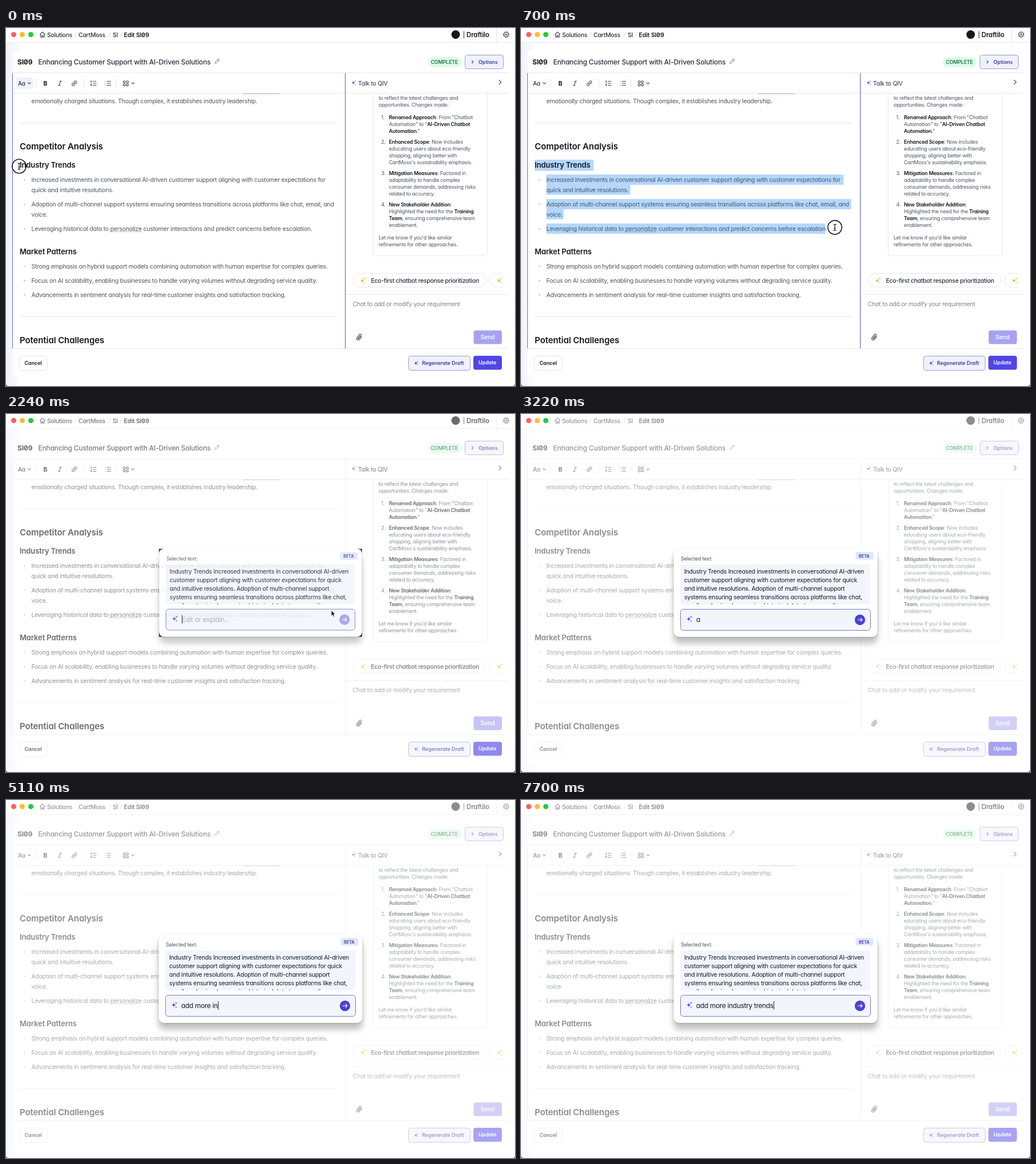
Write an HTML page that moves like this. It is 892 px wide and 628 px high and loops after 8000 ms.

```html
<!DOCTYPE html>
<html lang="en">
<head>
<meta charset="utf-8">
<title>Requirement editor</title>
<style>
  html, body { margin: 0; width: 100%; height: 100%; overflow: hidden; background: #fff; }
  svg { display: block; }
  text { font: 400 10.5px Inter, "Liberation Sans", sans-serif; letter-spacing: -.022em;
         font-feature-settings: "cv11", "zero"; fill: #4b5563; white-space: pre; }
  .dark { fill: #111827; }
  .medium { font-weight: 500; fill: #2b303b; letter-spacing: -.027em; }
  .strong { font-weight: 600; fill: #14171f; letter-spacing: -.012em; }
  .title { font-size: 12px; letter-spacing: -.015em; }
  .h2 { font-size: 15px; font-weight: 600; fill: #14171f; letter-spacing: -.007em; }
  .h3 { font-size: 13px; font-weight: 600; fill: #14171f; letter-spacing: -.009em; }
  .button { font-size: 9px; font-weight: 600; letter-spacing: -.005em; }
  .small { font-size: 9px; letter-spacing: -.026em; }
  .small tspan { font-weight: 600; fill: #14171f; }
  .entry { font-size: 12px; letter-spacing: -.028em; }
  .indigo { fill: #413d9f; }
  .grey { fill: #7b828f; }
  .white { fill: #fff; }
  .rule { stroke: #e5e7eb; fill: none; }
  .box { stroke: #e5e7eb; fill: #fff; }
  .soft { stroke: #9a9bcd; fill: #eff2fc; }
  .icon { stroke: #3c4350; fill: none; stroke-width: 1.1; stroke-linecap: round; stroke-linejoin: round; }
  .dots { stroke: #6b7280; stroke-dasharray: 1 1; }
</style>
</head>
<body>
<svg width="892" height="628" viewBox="0 0 892 628">
  <defs>
    <linearGradient id="edge"><stop stop-color="#eff3f9"/><stop offset="1" stop-color="#fafbfd"/></linearGradient>
    <clipPath id="quoteClip"><path d="M279 264h333v70H279z"/></clipPath>
    <g id="sparkle">
      <path id="star" d="M0-4.6C.5-1.2 1.2-.5 4.6 0 1.2.5.5 1.2 0 4.6-.5 1.2-1.2.5-4.6 0-1.2-.5-.5-1.2 0-4.6z"/>
      <use href="#star" transform="translate(4 -3.6) scale(.45)"/>
      <use href="#star" transform="translate(4 3.8) scale(.38)"/>
    </g>
    <path id="chevron" d="M-2.3-1.1 0 1.2 2.3-1.1"/>
  </defs>

  <rect width="892" height="628" fill="#fff"/>
  <path d="M0 26H24V40H12V613H23V628H0z" fill="url(#edge)"/>

  <!-- title bar -->
  <path class="rule" d="M0 25.5H892M859.5 0V25"/>
  <path class="icon" d="M59.5 11.3 64 7l4.5 4.3M60.8 10.5V16h6.4V10.5M63 16v-3h2v3"/>
  <text class="medium" x="72" y="15.5">Solutions</text>
  <text class="medium" x="127" y="15.5">CartMoss</text>
  <text class="medium" x="187" y="15.5">SI</text>
  <text class="strong" x="206.5" y="15.5">Edit SI09</text>
  <path stroke="#d3d6dc" d="M120.5 15.5 123.5 7.5M180.5 15.5 183.5 7.5M200 15.5 203 7.5"/>
  <circle cx="788" cy="11.5" r="7.5" fill="#17181c"/>
  <path stroke="#333" d="M802.5 5.5V18"/>
  <text class="strong" x="807" y="15.5" style="font-size:11.5px">Draftilo</text>
  <g class="icon"><circle cx="876.5" cy="11.5" r="4"/><circle cx="876.5" cy="11.5" r="1.5"/>
    <circle cx="876.5" cy="11.5" r="4.8" stroke-width="1.3" stroke-dasharray="1.6 2.17" stroke-linecap="butt"/></g>

  <!-- document header -->
  <text class="strong title" x="20" y="63.5" style="font-weight:700">SI09</text>
  <text class="medium title" x="56.5" y="63.5">Enhancing Customer Support with AI-Driven Solutions</text>
  <path class="icon" stroke-width=".9" style="stroke:#9aa1ad" d="M365.8 62.5l.7-2.7 5.7-5.7 2 2-5.7 5.7zM370.8 55.5l2 2"/>
  <rect x="739.5" y="51" width="59" height="18" rx="9" fill="#dcfce7"/>
  <text class="small" x="744.5" y="63" style="font-weight:500;fill:#166534">COMPLETE</text>
  <rect class="soft" x="804.5" y="47.5" width="67" height="24" rx="4"/>
  <use href="#chevron" class="icon" style="stroke:#413d9f" transform="translate(817.5 59.5) rotate(-90)"/>
  <text class="button indigo" x="828" y="62.8">Options</text>
  <path class="rule" d="M12 78.5H881M12 114.5H881M12 562.5H881M11.5 79V562M595.5 79V562"/>

  <!-- toolbar -->
  <rect id="styleHover" x="18" y="86" width="29.5" height="21.5" rx="4" fill="#f0f2fb"/>
  <text class="medium" x="21" y="100.5" style="font-size:10px">Aa</text>
  <use href="#chevron" class="icon" x="40.8" y="97"/>
  <text class="strong" x="65.5" y="100.8" style="font-weight:700">B</text>
  <path class="icon" d="M93.8 93.2h3.8M91.2 100.7H95M95.7 93.2l-2.6 7.5"/>
  <g class="icon" transform="translate(119.8 97) rotate(-45)"><path d="M-.8-2H-3a2 2 0 0 0 0 4h2.2M.8-2H3a2 2 0 0 1 0 4H.8M-2 0H2"/></g>
  <path class="rule" d="M52.5 89v16M136.5 89v16M192.5 89v16"/>
  <path class="icon" d="M152.5 93.5h5.5M152.5 97h5.5M152.5 100.5h5.5M148.5 93.3l1-.5V96M148.5 98.5h1.5l-1.5 2.5h1.5M177 93.5h6.5M177 97h6.5M177 100.5h6.5M173.8 93.5h.1M173.8 97h.1M173.8 100.5h.1"/>
  <g class="icon"><rect x="205.5" y="92.8" width="3.4" height="3.4" rx="1"/><rect x="211" y="92.8" width="3.4" height="3.4" rx="1"/>
    <rect x="205.5" y="98" width="3.4" height="3.4" rx="1"/><rect x="211" y="98" width="3.4" height="3.4" rx="1"/></g>
  <use href="#chevron" class="icon" x="222.5" y="97"/>

  <!-- document -->
  <path class="rule" d="M24 166.5H581.5M24 506.5H581.5"/>
  <path class="dots" d="M416 115.5h64"/>
  <g id="selection" fill="#b3d7ff"></g>
  <g id="document"></g>
  <path class="dots" d="M182 357.5h55"/>

  <!-- chat -->
  <use href="#sparkle" fill="#4f46e5" transform="translate(608.8 96) scale(.8)"/>
  <text x="617" y="100.8" style="fill:#2b303b">Talk to QIV</text>
  <use href="#chevron" class="icon" style="stroke:#6b7280" transform="translate(866 95) rotate(-90) scale(1.5)"/>
  <path class="rule" d="M643.5 115V394.5a5 5 0 0 0 5 5H838.5a5 5 0 0 0 5-5V115M596 467.5H881"/>
  <g id="chat"></g>
  <rect class="box" x="608.5" y="430.5" width="232" height="24" rx="12"/>
  <path class="rule" d="M870 430.5H859.5a12 12 0 0 0 0 24H870"/>
  <use href="#sparkle" fill="#eab93b" transform="translate(624.5 443)"/>
  <use href="#sparkle" fill="#eab93b" transform="translate(864 443)"/>
  <path fill="#fff" d="M870 430h8v26h-8z"/>
  <text class="medium" x="639.5" y="446.6">Eco-first chatbot response prioritization</text>
  <text class="grey" x="607.5" y="488.3">Chat to add or modify your requirement</text>
  <g class="icon" transform="translate(619 542.5) rotate(40)"><path d="M2.8-3.5V3a2.8 2.8 0 0 1-5.6 0V-4a1.9 1.9 0 0 1 3.8 0V2.6a.9.9 0 0 1-1.8 0V-3"/></g>
  <rect x="819.5" y="530.5" width="49.5" height="24" rx="4" fill="#a7a2f0"/>
  <text class="white" x="831.5" y="546.3" style="font-weight:500">Send</text>

  <!-- footer -->
  <rect class="box" x="23.5" y="575.5" width="49" height="25" rx="4"/>
  <text class="button dark" x="32.5" y="591">Cancel</text>
  <rect class="soft" x="705.5" y="575.5" width="108" height="25" rx="4"/>
  <use href="#sparkle" fill="#413d9f" transform="translate(718.3 588) scale(.75)"/>
  <text class="button indigo" x="729" y="591">Regenerate Draft</text>
  <rect x="819" y="575" width="50" height="24.5" rx="4" fill="#4f46e5"/>
  <text class="button white" x="828" y="590.3">Update</text>

  <path id="focusLines" stroke="#6c69cf" d="M11.5 79V562M594.5 79V562"/>
  <g id="assist">
    <circle cx="564.5" cy="345" r="9.7" fill="#e0e5fb"/>
    <use href="#sparkle" fill="#4f46e5" transform="translate(564 345)"/>
  </g>
  <rect id="dim" width="892" height="628" fill="#fff"/>
  <circle cx="13.5" cy="11.5" r="4.5" fill="#ff5f57"/>
  <circle cx="28.5" cy="11.5" r="4.5" fill="#febc2e"/>
  <circle cx="43.5" cy="11.5" r="4.5" fill="#28c840"/>
  <path d="M0 624V628H4A4 4 0 0 1 0 624zM892 624V628H888A4 4 0 0 0 892 624z" fill="#222"/>

  <!-- edit dialog -->
  <g id="dialog">
    <path id="corners" fill="#222" fill-rule="evenodd" d="M267 236H625V391.5H267zM276 236H616a9 9 0 0 1 9 9V382.5a9 9 0 0 1-9 9H276a9 9 0 0 1-9-9V245a9 9 0 0 1 9-9z"/>
    <rect x="267.5" y="236" width="357" height="155" rx="9" fill="#fff" style="filter:drop-shadow(0 11px 6px rgba(0,0,0,.22)) drop-shadow(0 1px 1.5px rgba(0,0,0,.2))"/>
    <text class="small" x="280" y="257">Selected text:</text>
    <rect x="586.5" y="242" width="31" height="13.5" rx="3" fill="#e0e7ff"/>
    <text class="button indigo" x="592" y="251.5" style="font-size:7.3px">BETA</text>
    <rect x="279" y="264" width="333" height="70" fill="#f2f5fc"/>
    <g id="quote" clip-path="url(#quoteClip)"></g>
    <rect x="279.5" y="342.5" width="333" height="37" rx="5" fill="#f2f5fc" stroke="#7779bd"/>
    <use href="#sparkle" fill="#4f46e5" transform="translate(294 359.5)"/>
    <text id="placeholder" class="entry" x="307" y="365" style="fill:#9ca3af">Edit or explain...</text>
    <text id="typed" class="entry dark" x="307" y="365"></text>
    <rect id="caret" y="353" width="1" height="15" fill="#111827"/>
    <circle id="send" cx="594" cy="361" r="9.2" fill="#4a41d3"/>
    <path d="M589.8 361h8.2M594.7 357.6l3.4 3.4-3.4 3.4" fill="none" stroke="#fff" stroke-width="1.1"/>
  </g>

  <g id="pointer">
    <g id="beam" fill="none" stroke="#17181c">
      <circle id="ring" r="12.2" stroke-width="1.6"/>
      <path stroke-width="1.2" d="M-2.5-5.5Q0-5.5 0-4Q0-5.5 2.5-5.5M0-4.5V4.5M-2.5 5.5Q0 5.5 0 4Q0 5.5 2.5 5.5M-1.5 1.5H1.5"/>
    </g>
    <path id="arrow" d="M0 0V9.8L2.3 7.7 3.9 11.3 5.7 10.5 4.1 7H7.2z" fill="#111" stroke="#fff" stroke-width=".8"/>
  </g>
</svg>
<script>
const $ = id => document.getElementById(id);
const clamp = (v, lo = 0, hi = 1) => Math.min(hi, Math.max(lo, v));
const smooth = u => u * u * (3 - 2 * u);
const show = (id, on) => $(id).setAttribute("visibility", on ? "visible" : "hidden");

// Lines of text going down from (x, y); *...* marks bold words.
function write(id, cls, x, y, step, ...lines) {
  $(id).innerHTML += lines.map((line, i) =>
    `<text class="${cls}" x="${x}" y="${y + i * step}">${line.replace(/\*(.+?)\*/g, "<tspan>$1</tspan>")}</text>`).join("");
}
function bullet(y, ...lines) {
  $("document").innerHTML += `<circle cx="32.5" cy="${y - 3.5}" r="1.7" fill="#d3d8e0"/>`;
  write("document", "", 44.5, y, 18, ...lines);
}

write("document", "", 44.5, 131.8, 18, "emotionally charged situations. Though complex, it establishes industry leadership.");
write("document", "h2", 24, 213.2, 340, "Competitor Analysis", "Potential Challenges");
write("document", "h3", 24, 244.9, 152, "Industry Trends", "Market Patterns");
bullet(269.7, "Increased investments in conversational AI-driven customer support aligning with customer expectations for",
  "quick and intuitive resolutions.");
bullet(312.8, "Adoption of multi-channel support systems ensuring seamless transitions across platforms like chat, email, and", "voice.");
bullet(355.8, "Leveraging historical data to personalize customer interactions and predict concerns before escalation.");
bullet(421.6, "Strong emphasis on hybrid support models combining automation with human expertise for complex queries.");
bullet(446.7, "Focus on AI scalability, enabling businesses to handle varying volumes without degrading service quality.");
bullet(471.8, "Advancements in sentiment analysis for real-time customer insights and satisfaction tracking.");

write("chat", "small", 653, 126, 12, "to reflect the latest challenges and", "opportunities. Changes made:");
[
  [159.7, "*Renamed Approach*: From \"Chatbot", "Automation\" to \"*AI-Driven Chatbot*", "*Automation*.\""],
  [202.8, "*Enhanced Scope*: Now includes", "educating users about eco-friendly", "shopping, aligning better with", "CartMoss's sustainability emphasis."],
  [257.9, "*Mitigation Measures*: Factored in", "adaptability to handle complex", "consumer demands, addressing risks", "related to accuracy."],
  [313, "*New Stakeholder Addition*:", "Highlighted the need for the *Training*", "*Team*, ensuring comprehensive team", "enablement."]
].forEach(([y, ...lines], i) => {
  write("chat", "small", 657.5, y, 12, `${i + 1}.`);
  write("chat", "small", 671, y, 12, ...lines);
});
write("chat", "small", 653, 371.2, 12, "Let me know if you'd like similar", "refinements for other approaches.");

write("quote", "dark", 286, 279.7, 15, "Industry Trends Increased investments in conversational AI-driven",
  "customer support aligning with customer expectations for quick", "and intuitive resolutions. Adoption of multi-channel support",
  "systems ensuring seamless transitions across platforms like chat,", "email, and voice. Leveraging historical data to personalize");

// Selectable lines: left, right, top, bottom
const lines = [[24, 127, 231, 250.5], [44.5, 565, 257, 275], [44.5, 191.5, 275, 292.5],
  [44.5, 578.5, 300, 318], [44.5, 74.5, 318, 335.5], [44.5, 533, 343, 361]];
$("selection").innerHTML = lines.map(([x, , top, bottom]) =>
  `<rect x="${x}" y="${top}" height="${bottom - top}"/>`).join("");

const phrase = "add more industry trends";
const keyTimes = [2730, 3290, 3430, 3570, 3710, 3850, 3990, 4200, 4340, 4550, 5110, 5390,
  5740, 5880, 6020, 6160, 6440, 6580, 6650, 6790, 6930, 7420, 7560, 7700];

function select(x, y) {
  lines.forEach(([left, right, , bottom], i) => {
    const above = i ? lines[i - 1][3] : 0;
    const end = y > bottom ? right : y > above ? clamp(x, left, right) : left;
    $("selection").children[i].setAttribute("width", end - left);
  });
}

function movePointer(t) {
  const drag = smooth(clamp((t - 70) / 630));
  const approach = smooth(clamp((t - 1190) / 350));
  const settle = clamp((t - 1820) / 210);
  const x = 23 + 527 * drag + 16 * approach + 4 * settle;
  const y = 242.5 + 107.3 * drag - 3.3 * approach - 2 * settle;
  $("pointer").setAttribute("transform", `translate(${x} ${y})`);
  $("ring").setAttribute("opacity", clamp((1050 - t) / 210));
  const arrow = approach > .5;
  show("beam", !arrow);
  show("arrow", arrow && t < keyTimes[0]);
  select(x, y);
}

function openDialog(t) {
  const p = 1 - (1 - clamp((t - 2170) / 200)) ** 3;
  const scale = .98 + .02 * p;
  $("dim").setAttribute("opacity", .5 * p);
  $("dialog").setAttribute("opacity", Math.sqrt(p));
  $("dialog").setAttribute("transform", `translate(446 313.5) scale(${scale}) translate(-446 -313.5)`);
  show("corners", p > 0 && p < 1);
  show("selection", p === 0);
  show("focusLines", p === 0);
  show("assist", t >= 1260 && p === 0);
  show("styleHover", t < 140);
}

function type(t) {
  const count = keyTimes.filter(k => k <= t).length;
  $("typed").textContent = phrase.slice(0, count);
  show("placeholder", count === 0);
  $("caret").setAttribute("x", 307.3 + (count ? $("typed").getComputedTextLength() : 0));
  show("caret", t < 3220 || t >= 3290);
  $("send").setAttribute("opacity", .5 + .5 * clamp((t - 2730) / 140));
}

function frame(now) {
  const t = Math.floor(now % 8000 / 70) * 70; // motion advances in 70 ms ticks
  movePointer(t);
  openDialog(t);
  type(t);
  requestAnimationFrame(frame);
}
requestAnimationFrame(frame);
</script>
</body>
</html>
```
